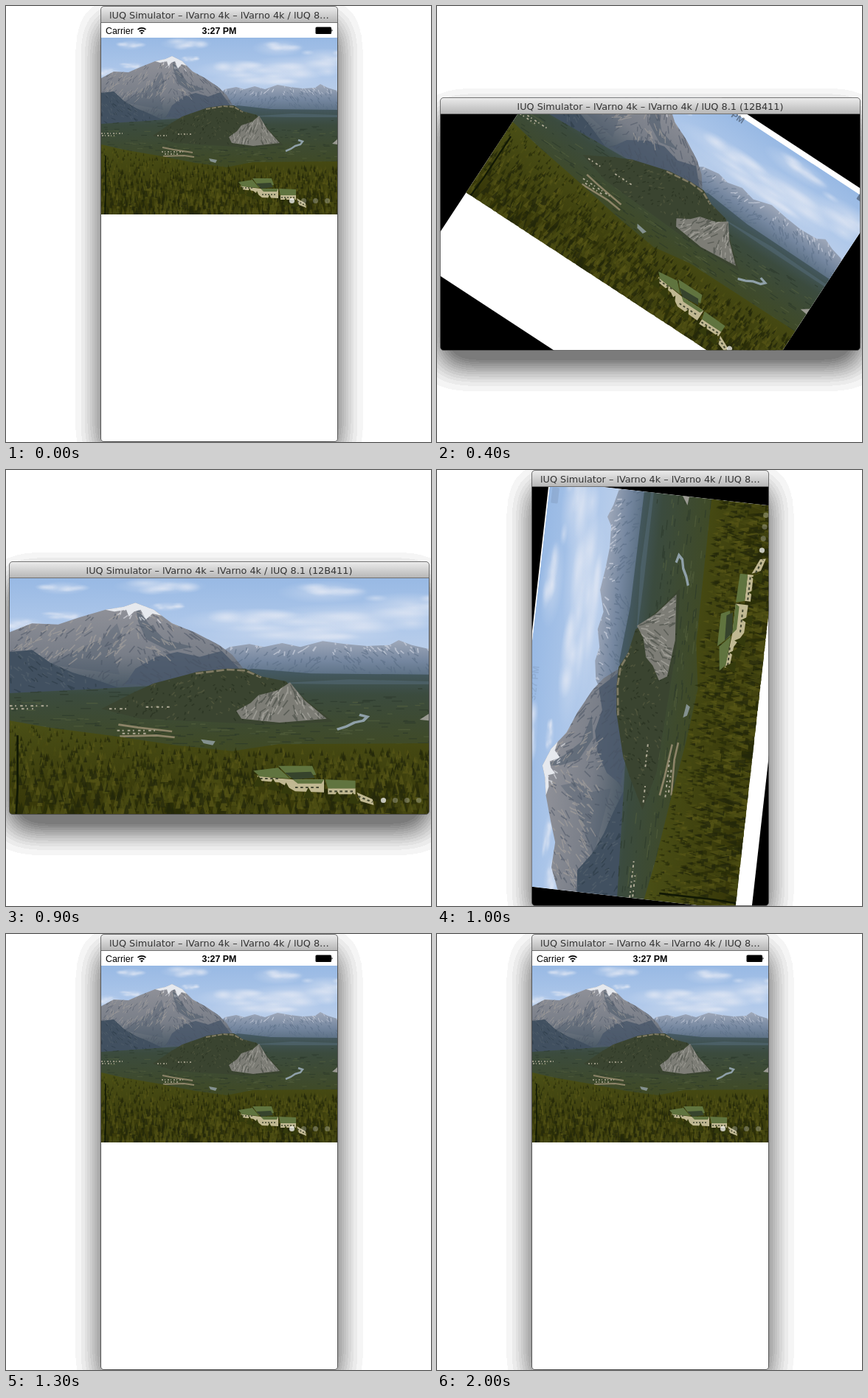
These frames come from a looping animation (576x592 px, 2400 ms). An HTML page:

```html
<!DOCTYPE html>
<html lang="en">
<head>
<meta charset="utf-8">
<title>Rotating simulator window</title>
<style>
  html, body { margin: 0; width: 100%; height: 100%; overflow: hidden; background: #fff; }
  svg { display: block; width: 576px; height: 592px; }
  #title { font: 12.8px "DejaVu Sans", "Open Sans", sans-serif; fill: #333; text-anchor: middle; }
  #status { font: 12.4px "Liberation Sans", Arial, sans-serif; }
</style>
</head>
<body>
<svg id="stage" viewBox="0 0 576 592" xmlns="http://www.w3.org/2000/svg">
  <defs>
    <filter id="shade" filterUnits="userSpaceOnUse" x="-120" y="-120" width="816" height="840">
      <feGaussianBlur stdDeviation="22"/>
      <feComponentTransfer><feFuncA id="bands" type="discrete"/></feComponentTransfer>
    </filter>
    <clipPath id="frame"><rect class="win" rx="4.5"/></clipPath>
    <linearGradient id="bar" x2="0" y2="1">
      <stop stop-color="#ededed"/><stop offset="1" stop-color="#b5b5b5"/>
    </linearGradient>
    <linearGradient id="sky" x2="0" y2="1">
      <stop stop-color="#98b9e4"/><stop offset=".5" stop-color="#afc8ea"/><stop offset="1" stop-color="#c5d4ea"/>
    </linearGradient>
    <linearGradient id="far" x2="0" y2="1">
      <stop stop-color="#a0a9ba"/><stop offset=".45" stop-color="#7587a0"/><stop offset="1" stop-color="#4a6070"/>
    </linearGradient>
    <linearGradient id="rock" x2="0" y2="1">
      <stop stop-color="#92939a"/><stop offset=".55" stop-color="#797e88"/><stop offset="1" stop-color="#3e505e"/>
    </linearGradient>
    <linearGradient id="valley" x2="0" y2="1">
      <stop stop-color="#455a66"/><stop offset=".3" stop-color="#3b4b3e"/><stop offset="1" stop-color="#404a22"/>
    </linearGradient>
    <linearGradient id="wood" x2="0" y2="1">
      <stop stop-color="#4a4f16"/><stop offset="1" stop-color="#363608"/>
    </linearGradient>
    <radialGradient id="puff">
      <stop stop-color="#e4e9f4" stop-opacity=".5"/><stop offset="1" stop-color="#dce5f4" stop-opacity="0"/>
    </radialGradient>
    <clipPath id="peakClip"><use href="#peak"/></clipPath>
    <clipPath id="spurClip"><use href="#spur"/></clipPath>
    <clipPath id="farClip"><use href="#range"/></clipPath>
    <clipPath id="hillClip"><use href="#hill"/></clipPath>
    <clipPath id="cliffClip"><use href="#cliff"/></clipPath>
    <clipPath id="photoClip"><rect width="320" height="240"/></clipPath>
  </defs>

  <rect class="win" rx="5" filter="url(#shade)" transform="translate(0 21.5)"/>
  <g clip-path="url(#frame)">
    <rect width="576" height="592"/>
    <g id="view">
      <rect id="page" fill="#fff"/>
      <g id="photo"><g clip-path="url(#photoClip)">
        <rect width="320" height="100" fill="url(#sky)"/>
        <g id="clouds" fill="url(#puff)"></g>
        <path id="range" fill="url(#far)" d="M160 76 168 70 183 67 194 70 208 66 222 70 239 64 256 67 273 69 290 68 297 63 307 68 320 72V110H160Z"/>
        <g id="farMarks" clip-path="url(#farClip)" fill="none"></g>
        <path id="peak" fill="url(#rock)" d="M0 55 17 46 37 47 53 40 73 32 87 29 96 25 110 32 124 46 141 55 160 68 170 78 176 88 190 112 0 120Z"/>
        <g clip-path="url(#peakClip)" fill="#4b596b">
          <path d="M88 108 96 92 112 80 128 75 145 80 162 74 190 112Z" opacity=".85"/>
          <path d="M96 27 106 46 118 62 140 70 122 74 104 62 98 44Z" opacity=".55"/>
          <path d="M30 88 52 72 70 62 82 46 86 62 80 80 84 98Z" opacity=".35"/>
          <g id="rockMarks" fill="none"></g>
        </g>
        <path fill="#e6e9ee" d="M73 32 87 29 96 25 110 32 116 38 109 36 104 42 100 32 95 34 91 39 89 32 80 34Z"/>
        <path id="spur" fill="#415060" d="M0 75 17 73 31 86 48 96 65 103 93 116 0 124Z"/>
        <g id="spurMarks" clip-path="url(#spurClip)" fill="none"></g>
        <path fill="url(#valley)" d="M0 117 60 113 130 108 185 92 230 97 320 98V180H0Z"/>
        <path fill="#5a6f7f" d="M200 107 260 103 320 105V108L250 108Z" opacity=".45"/>
        <g id="valleyMarks" fill="none"></g>
        <path fill="#9b9a93" d="M313 144 320 138V145Z"/>
        <path id="hill" fill="#3a4430" d="M70 133 95 116 110 107 144 95 166 92 180 92 192 100 211 105 228 126 247 146 200 149 100 143Z"/>
        <path fill="none" stroke="#807b63" stroke-width="2" stroke-dasharray="6 2" d="M142 97 166 93 180 94 192 101"/>
        <g id="hillMarks" clip-path="url(#hillClip)" fill="none"></g>
        <path id="cliff" fill="#7d7d76" d="M173 135 184 127 190 119 205 114 214 106 225 124 242 143 206 147 177 143Z"/>
        <g id="cliffMarks" clip-path="url(#cliffClip)" fill="none"></g>
        <path fill="none" stroke="#8fa0a8" stroke-width="2.5" d="M250 154 257 151 263 147 270 145 273 141 267 139"/>
        <path fill="none" stroke="#8d8468" stroke-width="2" d="M83 149 98 152 124 156M84 161 112 160 126 162"/>
        <path fill="none" stroke="#b1ac98" stroke-width="1.5" stroke-dasharray="2 2 1 3" d="M0 130H32M1 133H18M76 133H92M104 131H122M82 155H112M86 158H104"/>
        <path fill="#84918f" d="M146 164 157 166 155 170 148 168Z"/>
        <path fill="url(#wood)" d="M0 145 30 152 82 161 127 170 170 176 205 169 320 168V240H0Z"/>
        <g id="trees"></g>
        <path fill="#c0b892" d="M189 201 200 203 216 205H240V218L218 217 206 208 190 206ZM243 214H264V220H243ZM265 218 277 225 278 231 268 227Z"/>
        <path fill="#60743f" d="M186 196 205 193 214 204 191 202ZM205 191 231 191 234 200 214 203ZM241 205 264 206 264 214 243 214ZM216 205H240L238 209H220Z"/>
        <path fill="#36432c" d="M210 198 230 197 233 203 217 205Z"/>
        <path fill="none" stroke="#464a34" stroke-width="1.6" stroke-dasharray="2 2" d="M218 213H238M244 217H264M266 222 277 228M191 204H205"/>
        <path fill="#343a0c" d="M186 212 190 201 195 212ZM197 215 201 204 207 217ZM207 219 211 208 216 220ZM224 224 228 213 233 224ZM246 227 250 217 255 228ZM258 229 262 218 267 230Z"/>
        <path fill="none" stroke="#111804" stroke-width="1.5" d="M6 160V215L5 240"/>
      </g></g>
      <g id="dots"></g>
      <g id="status">
        <text x="6" y="14.8">Carrier</text>
        <g fill="none" stroke="#000" stroke-width="1.7">
          <path d="M49.5 9A8 8 0 0 1 60.5 9M51.7 11.5A5 5 0 0 1 58.3 11.5"/>
          <path fill="#000" stroke="none" d="M53 13.2Q55 11.6 57 13.2L55 15.4Z"/>
        </g>
        <text id="clock" y="14.8" font-weight="bold" text-anchor="middle">3:27 PM</text>
        <g id="battery">
          <rect x="-29.5" y="5.5" width="21.5" height="9.5" rx="1.5"/>
          <path d="M-7.5 8.5Q-5.3 10.2-7.5 12Z"/>
        </g>
      </g>
    </g>
    <g id="head">
      <rect id="bar1" height="23" fill="url(#bar)"/>
      <rect id="bar2" y="22" height="1" fill="#717171"/>
      <text id="title" x="289" y="17"></text>
    </g>
  </g>
  <rect class="win" rx="4.5" fill="none" stroke="#555" stroke-opacity=".65"/>
</svg>

<script>
const LOOP = 2400, STEP = 100, TURN = 245;
const LONG_TITLE = 'lUQ Simulator – lVarno 4k – lVarno 4k / lUQ 8.1 (12B411)';
const SHORT_TITLE = LONG_TITLE.slice(0, LONG_TITLE.indexOf('.1 (')) + '…';

const $ = id => document.getElementById(id);
const set = (el, attrs) => { for (const k in attrs) el.setAttribute(k, attrs[k]); return el; };
const add = (parent, tag, attrs) =>
  parent.appendChild(set(document.createElementNS('http://www.w3.org/2000/svg', tag), attrs));
const lerp = (a, b, p) => a + (b - a) * p;

let seed = 71;
const rnd = (a = 0, b = 1) => {
  seed = (seed * 16807) % 2147483647;
  return a + (b - a) * seed / 2147483647;
};

// One path made of n random marks
function scatter(id, n, attrs, mark) {
  let d = '';
  for (let i = 0; i < n; i++) d += mark();
  add($(id), 'path', { ...attrs, d });
}

// Lines that run down and away from the ridge at x = mid
const streak = (x0, x1, y0, y1, dx, dy, mid = (x0 + x1) / 2) => () => {
  const x = rnd(x0, x1), side = x < mid ? -1 : 1;
  return `M${x.toFixed(1)} ${rnd(y0, y1).toFixed(1)}l${(side * rnd(0, dx)).toFixed(1)} ${rnd(dy / 3, dy).toFixed(1)}`;
};

const dash = (y0, y1) => () =>
  `M${rnd(0, 320).toFixed(1)} ${rnd(y0, y1).toFixed(1)}h${rnd(2, 10).toFixed(1)}`;

function tree() {
  const x = rnd(0, 320), top = Math.min(174, 146 + x * 0.19);
  const y = lerp(top, 240, rnd()), h = 3 + (y - 145) * 0.1, w = h * 0.2;
  return `M${x.toFixed(1)} ${(y - h * 0.4).toFixed(1)}l${w.toFixed(1)} ${h.toFixed(1)}h${(-2 * w).toFixed(1)}z`;
}

function cloud(cx, cy, rx, ry) {
  add($('clouds'), 'ellipse', { cx, cy, rx, ry });
  for (let i = 0; i < 7; i++)
    add($('clouds'), 'ellipse', {
      cx: cx + rnd(-0.7, 0.7) * rx, cy: cy + rnd(-0.5, 0.5) * ry,
      rx: rx * rnd(0.2, 0.45), ry: ry * rnd(0.3, 0.6),
    });
}

function paint() {
  const clouds = [[40, 10, 20, 7], [115, 8, 36, 9], [42, 38, 18, 5], [120, 29, 14, 5], [240, 14, 36, 12],
    [304, 26, 36, 12], [183, 43, 55, 13], [265, 40, 72, 16], [225, 56, 75, 12], [8, 47, 20, 8]];
  clouds.forEach(c => cloud(...c));

  scatter('farMarks', 60, { stroke: '#d5dbe6', opacity: 0.6 }, streak(168, 320, 64, 76, 4, 5));
  scatter('farMarks', 120, { stroke: '#566b82', opacity: 0.5 }, streak(168, 320, 70, 98, 5, 6));
  scatter('rockMarks', 260, { stroke: '#485362', opacity: 0.5 }, streak(0, 180, 35, 108, 7, 7, 96));
  scatter('rockMarks', 130, { stroke: '#aaa59f', opacity: 0.55 }, streak(5, 125, 34, 82, 7, 7, 96));
  scatter('rockMarks', 14, { stroke: '#e9ecf0', opacity: 0.6 }, streak(78, 114, 28, 42, 4, 5, 96));
  scatter('spurMarks', 60, { stroke: '#5a6670', opacity: 0.5 }, streak(0, 60, 74, 108, 5, 5, 0));
  scatter('spurMarks', 60, { stroke: '#2c3b46', opacity: 0.6 }, streak(0, 90, 78, 118, 6, 5, 0));
  scatter('valleyMarks', 200, { stroke: '#283528', opacity: 0.55 }, dash(112, 172));
  scatter('valleyMarks', 90, { stroke: '#5b6640', opacity: 0.5 }, dash(126, 172));
  scatter('hillMarks', 190, { stroke: '#27301f', opacity: 0.65 }, streak(80, 240, 94, 146, 2, 3));
  scatter('hillMarks', 90, { stroke: '#5c6043', opacity: 0.6 }, streak(85, 215, 94, 142, 3, 3));
  scatter('cliffMarks', 75, { stroke: '#4a4f48', opacity: 0.65 }, streak(173, 242, 105, 142, 5, 11, 214));
  scatter('cliffMarks', 50, { stroke: '#aaa9a2', opacity: 0.7 }, streak(178, 238, 108, 140, 4, 9, 214));

  for (const fill of ['#262b08', '#4d5015', '#282c08', '#595717', '#22260a', '#484912'])
    scatter('trees', 290, { fill, opacity: 0.7 }, tree);

  for (let i = 0; i < 4; i++)
    add($('dots'), 'circle', { cx: 16 * i - 61.5, r: 3.6, fill: '#fff', 'fill-opacity': i ? 0.25 : 0.72 });

  set($('bands'), { tableValues: Array.from({ length: 20 }, (_, i) => Math.min(i * 0.04, 0.52)).join(' ') });
}

function ease(t) {
  const x = Math.min(1, Math.max(0, t / TURN));
  return x * x * (3 - 2 * x);
}

function render(t) {
  const wide = t >= 300 && t < 1000;
  const p = t < 800 ? ease(t - 256) : 1 - ease(t - 960);
  const [winW, winH] = wide ? [568, 320] : [320, 568];
  const x = 289 - winW / 2, y = 284 - winH / 2;

  for (const el of document.querySelectorAll('.win'))
    set(el, { x: x - 0.5, y: y + 0.5, width: winW + 1, height: winH + 23 });
  set($('head'), { transform: `translate(0 ${y})` });
  for (const id of ['bar1', 'bar2']) set($(id), { x: x - 1, width: winW + 2 });
  $('title').textContent = wide ? LONG_TITLE : SHORT_TITLE;

  // The turning view: its bounds change together with its angle
  const w = lerp(320, 568, p), h = lerp(568, 320, p);
  const top = lerp(20, 0, p), photoH = lerp(240, 320, p);
  const angle = wide ? 90 * (1 - p) : -90 * p;
  set($('view'), { transform: `translate(289 307) rotate(${angle}) translate(${-w / 2} ${-h / 2})` });
  set($('page'), { width: w, height: h });
  set($('photo'), { transform: `translate(0 ${top}) scale(${w / 320} ${photoH / 240})` });
  set($('dots'), { transform: `translate(${w} ${top + photoH - 18.5})` });
  set($('status'), { opacity: 1 - p });
  set($('clock'), { x: w / 2 });
  set($('battery'), { transform: `translate(${w} 0)` });
}

let last = -1;
function tick() {
  const t = Math.floor((performance.now() % LOOP) / STEP) * STEP;
  if (t !== last) render(last = t);
  requestAnimationFrame(tick);
}

paint();
tick();
</script>
</body>
</html>
```
